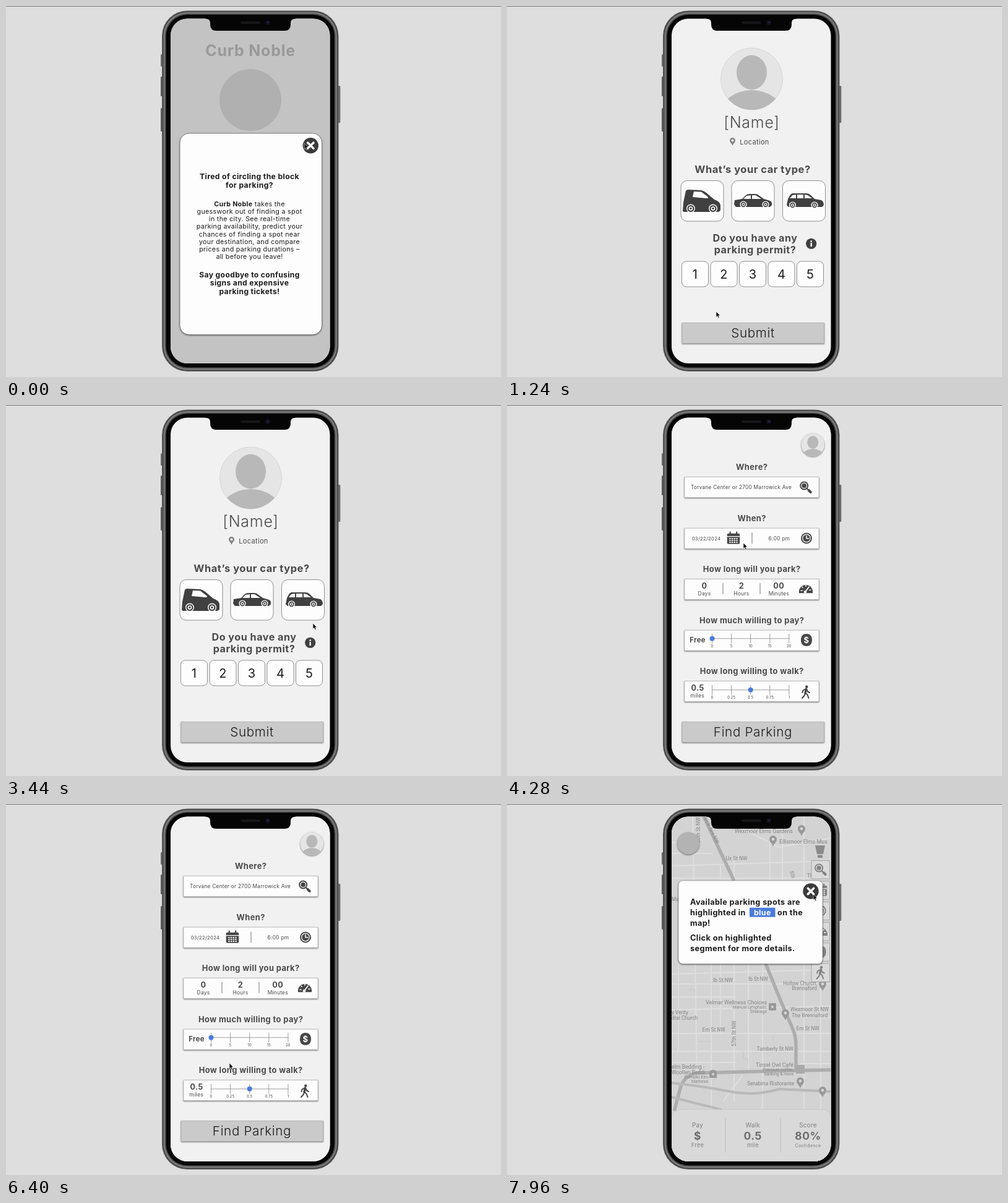
An HTML page that plays this animation: 800 by 600 pixels, repeating every 8000 ms.

```html
<!DOCTYPE html>
<html lang="en">
<head>
<meta charset="utf-8">
<title>Parking app walkthrough</title>
<style>
html, body { margin: 0; width: 100%; height: 100%; overflow: hidden; background: #dedede; }
svg { display: block; width: 800px; height: 600px; }
text { font-family: Inter, sans-serif; letter-spacing: .03em; text-anchor: middle; fill: #4a4a4a; }
.b { font-weight: 700; }
.t { font-weight: 300; }
.s { text-anchor: start; }
.e { text-anchor: end; }
.ink text, .ink { fill: #1c1c1c; }
.map text { font-family: Roboto, sans-serif; letter-spacing: 0; fill: #858585; }
.shade { filter: drop-shadow(0 1px 1px #0008); }
.line { fill: none; stroke-linecap: round; stroke-linejoin: round; }
</style>
</head>
<body>
<svg id="stage" viewBox="0 0 800 600"></svg>
<script>
const text = (x, y, size, str, cls = '', more = '') =>
  `<text x="${x}" y="${y}" font-size="${size}" class="${cls}" ${more}>${str}</text>`;
const lines = (x, y, step, size, list, cls) =>
  list.map((str, i) => text(x, y + i * step, size, str, cls)).join('');
const rect = (x, y, w, h, rx, fill, more = '') =>
  `<rect x="${x}" y="${y}" width="${w}" height="${h}" rx="${rx}" fill="${fill}" ${more}/>`;
const circle = (x, y, r, fill, more = '') =>
  `<circle cx="${x}" cy="${y}" r="${r}" fill="${fill}" ${more}/>`;
const path = (d, fill, more = '') => `<path d="${d}" fill="${fill}" ${more}/>`;
const stroke = (d, color, width, more = '') =>
  `<path class="line" d="${d}" stroke="${color}" stroke-width="${width}" ${more}/>`;
const use = (id, x, y, scale = 1) =>
  `<use href="#${id}" transform="translate(${x} ${y}) scale(${scale})"/>`;
const page = (fill = '#f1f1f1') => rect(264, 18, 262, 564, 0, fill);
const shaded = 'class="shade"';

const dark = '#474747';
const defs = `<defs>
  <clipPath id="screen">${rect(266, 20.5, 257.5, 557.5, 27, '#000')}</clipPath>
  <clipPath id="round">${circle(0, 0, 50, '#000')}</clipPath>
  <g id="avatar">${circle(0, 0, 50, '#e5e5e5', 'stroke="#d6d6d6"')}
    <g clip-path="url(#round)" fill="#b8b8b8"><ellipse cy="-10.5" rx="24.5" ry="28"/><ellipse cy="53" rx="48" ry="35"/></g></g>
  <g id="close">${circle(0, 0, 12.7, '#3b3b3b')}${stroke('M-4.7-4.7L4.7 4.7M4.7-4.7L-4.7 4.7', '#fff', 3.4)}</g>
  <g id="search">${circle(-2.5, -2.5, 6, '#fff', `stroke="${dark}" stroke-width="2"`)}${circle(-2.5, -2.5, 3.8, dark)}
    ${stroke('M2.5 2.5L4.5 4.5', dark, 2)}${stroke('M5 5L8 8', dark, 4)}</g>
  <g id="calendar">${rect(-10, -7.5, 20.5, 17, 2, dark)}${stroke('M-10-2.5H10', '#fff', 1.2)}
    ${stroke('M-5-9.5V-6M5.5-9.5V-6', dark, 2.2)}
    ${stroke('M-6.5 1H7M-6.5 4H7M-6.5 7H7', '#fff', 1.8, 'style="stroke-linecap:butt;stroke-dasharray:2.4 1.3"')}</g>
  <g id="clock">${circle(0, 0, 9, dark)}${circle(0, 0, 6.3, 'none', 'stroke="#fff" stroke-width="1.2"')}
    ${stroke('M0-4V.3H3.6', '#fff', 1.5)}</g>
  <g id="gauge">${path('M-11 7A11.2 11.2 0 1 1 11 7Z', dark)}
    ${stroke('M-8 3H-6M-6-3L-5-2M0-6V-4M6 2H8', '#fff', 1.5)}${stroke('M-1 5L5-3', '#fff', 1.8)}${circle(-1, 5, 2.2, '#fff')}</g>
  <g id="dollar">${path('M0-10C6-10 9-6 9 0S6 10 0 10S-9 6-9 0S-6-10 0-10', dark)}
    ${text(0, 4.8, 13, '$', 'b', 'style="fill:#fff"')}</g>
  <g id="walk">${circle(1.3, -8.2, 2.2, dark)}${stroke('M.5-4.5L-1 2', dark, 3.4)}
    ${stroke('M0-5L-4.5-2.5L-5.5 1M1.5-4L3-.5L6 1M-1 2L-2.5 6L-6 10M-1 1.5L2.5 4.5L4.5 10', dark, 2)}</g>
  <g id="pin">${path('M0 10C-1 5-6 3-6-2A6 6 0 0 1 6-2C6 3 1 5 0 10Z', '#999')}${circle(0, -2, 2.3, '#d8d8d8')}</g>
</defs>`;

// Nested rounded bands, from the outer edge inwards
const band = (inset, fill) => rect(252 + inset, 7.5 + inset, 285.5 - 2 * inset, 583.5 - 2 * inset, 41 - inset, fill);
const phone = rect(250, 78, 4, 20, 1.5, '#6a6a6a') + rect(250, 114, 4, 32, 1.5, '#5a5a5a') +
  rect(250, 165, 4, 38, 1.5, '#5a5a5a') + rect(536, 129, 4.3, 60, 1.5, '#6a6a6a') +
  band(0, '#5c5c5c') + band(1.2, '#444') + band(2.6, '#7c7c7c') + band(4.8, '#4e4e4e') + band(6.6, '#050505');

const notch = path('M322 14V20.5Q330 20.5 330 27V30Q330 40 340 40H450Q460 40 460 30V27Q460 20.5 468 20.5V14Z', '#050505') +
  rect(379, 25, 32, 4, 2, '#171719') + circle(423, 27, 4, '#10101f') + circle(423.5, 26.5, 1.5, '#262650');

const appName = 'Curb Noble';
const home = page('#c3c3c3') + text(395, 80.5, 25, appName, 'b', 'style="fill:#999"') + circle(395, 152, 50, '#b0b0b0') +
  rect(281, 206, 229.5, 325.5, 15, '#fdfdfd', shaded + ' stroke="#777" stroke-width=".8"') + use('close', 492.3, 225.7) +
  '<g class="ink">' + lines(393.5, 280, 14, 12.2, ['Tired of circling the block', 'for parking?'], 'b') +
  lines(393.5, 323.5, 12.25, 10.7, [`<tspan class="b">${appName}</tspan> takes the`, 'guesswork out of finding a spot',
    'in the city. See real-time', 'parking availability, predict your', 'chances of finding a spot near',
    'your destination, and compare', 'prices and parking durations –', 'all before you leave!']) +
  lines(393.5, 438.8, 13.4, 12.1, ['Say goodbye to confusing', 'signs and expensive', 'parking tickets!'], 'b') + '</g>';

const wheel = (x, y, r) => circle(x, y, r + 1.4, '#fff') + circle(x, y, r, '#404040') + circle(x, y, r * .6, '#fff') + circle(x, y, r * .3, '#404040');
const car = (body, glass, y, r, ...xs) => path(body, '#404040') + path(glass, '#fff') + xs.map(x => wheel(x, y, r)).join('');
const cars =
  car('M284 331L285 318L289 299Q290 297 293 297L314 298Q318 299 322 302L335 313Q344 316 345 322V330Q344 333 340 333H288Q284 333 284 331Z',
    'M300 309L302 300L314 300.500L325 309Q326 311 322 311Z', 327.5, 5.6, 297, 333) +
  car('M367 321L368 314L380 312L386 306Q388 304 392 304H402Q405 304 408 307L415 312L425 315Q429 317 428 322L425 325H370Z',
    'M382 312L387 307L394 306V312ZM396 312V306H402L411 312Z', 321, 4.2, 382, 418) +
  car('M452 322L454 312L458 305L461 303H484Q488 303 491 306L497 312L508 314Q512 316 512 322L509 325H455Z',
    'M457 311L461 306L467 305V311ZM469 311V305H479V311ZM481 311V305L486 306L493 311Z', 322, 4.2, 461.5, 497);

const button = str => rect(283, 512.5, 229.5, 33, 0, '#cacaca', shaded + ' stroke="#aaa" stroke-width=".6"') +
  text(397.5, 536, 20.7, str, 'ink t');

const profile = page() + use('avatar', 395.5, 118) + text(395.5, 197.3, 25, '[Name]', 't') +
  path('M364.5 226C363 222 360 220.5 360 217.5A4.5 4.5 0 0 1 369 217.5C369 220.5 366 222 364.5 226Z', '#858585') +
  circle(364.5, 217.5, 2, '#f1f1f1') + text(400, 223.5, 11, 'Location') +
  text(397, 269.5, 16.5, 'What’s your car type?', 'b') +
  [281, 363, 445.5].map(x => rect(x, 282.5, 69, 65.5, 10, '#fdfdfd', 'stroke="#777" stroke-width=".8"')).join('') + cars +
  text(401, 381, 16.2, 'Do you have any', 'b') + text(401, 400, 16.2, 'parking permit?', 'b') +
  circle(491.7, 384.3, 8.6, '#404040') + circle(491.7, 380.6, 1.4, '#fff') + rect(490.5, 383, 2.4, 6.2, 0, '#fff') +
  [1, 2, 3, 4, 5].map(n => rect(236 + n * 46.5, 413, 43, 41, 7, '#fdfdfd', 'stroke="#777" stroke-width=".8"') +
    text(257.7 + n * 46.5, 440.8, 20, n, 'ink')).join('') + button('Submit');

const permit = rect(264, 18, 262, 564, 0, '#afafaf', 'opacity=".71"') +
  rect(281.5, 329, 233, 148, 8, '#fdfdfd', shaded + ' stroke="#888" stroke-width=".6"') + use('close', 497.2, 348) +
  '<g class="ink">' + lines(308, 367.6, 15.05, 12.6, ['To help us suggest the', 'best parking options,', 'please let us know if you',
    'have a current DC', 'resident parking permit', 'or any other parking', 'permits that may apply.'], 's') + '</g>';

const slider = (y, dot, labels) => stroke(`M331.5 ${y}H456`, '#8a8a8a', .8) + labels.map((str, i) =>
  stroke(`M${331.5 + i * 31.1} ${y - 7.5}v15`, '#777', .7) + text(331.5 + i * 31.1, y + 14, 5.8, str)).join('') +
  circle(331.5 + dot * 31.1, y, 4, '#4a7bdc');
const heads = ['Where?', 'When?', 'How long will you park?', 'How much willing to pay?', 'How long willing to walk?'];
const divider = (x, y) => stroke(`M${x} ${y - 8.5}v17`, '#777', 1);
const find = page() + `<g ${shaded}>${circle(494.3, 64.3, 18.8, '#e0e0e0')}</g>` + use('avatar', 494.3, 64.3, .37) +
  heads.map((str, i) => text(395.7, 105 + i * 82.6, 12.9, str, 'b') +
    rect(287, 116.7 + i * 82.5, 217, 33, 0, '#fdfdfd', shaded + ' stroke="#aaa" stroke-width=".6"')).join('') +
  text(297, 136.3, 8.3, 'Torvane Center or 2700 Marrowick Ave', 's') + use('search', 482.7, 133) +
  text(322, 218.7, 7.8, '03/22/2024') + use('calendar', 365.7, 215.2) + divider(396, 215.5) +
  text(440, 218.7, 8.4, '6:00 pm') + use('clock', 484, 215.5) +
  [[319, '0', 'Days'], [379, '2', 'Hours'], [439.3, '00', 'Minutes']].map(([x, n, unit]) =>
    text(x, 296.8, 12.7, n, 'b') + text(x, 307.5, 8.4, unit)).join('') +
  divider(349, 297) + divider(409, 297) + use('gauge', 483, 297.3) +
  text(308, 383.8, 11.3, 'Free', 'b') + slider(377.7, 0, [0, 5, 10, 15, 20]) + use('dollar', 484, 380) +
  text(308, 462.3, 12.5, '0.5', 'b') + text(307.7, 473.2, 8.7, 'miles') +
  slider(460.8, 2, [0, .25, .5, .75, 1]) + use('walk', 483, 464) + button('Find Parking');

const labels = [
  [368, 46.5, 8.8, 'Wexmoor Elms Gardens', 's'], [440, 63.5, 8.8, 'Ellismoor Elms Mus', 's'],
  [371, 90.5, 8.3, 'Ux St NW'], [349, 288, 8.3, 'Ib St NW'], [406, 286, 8.3, 'Ib St NW'],
  [501, 292.5, 8.2, 'Hollow Church,', 'e'], [501, 300.5, 8.2, 'Brennaford', 'e'],
  [420, 324, 8.8, 'Velmar Wellness Choices', 'e'], [420, 331.3, 6.8, 'Manual Lymphatic', 'e'], [420, 338.3, 6.8, 'Drainage', 'e'],
  [458, 335.3, 8.5, 'Wexmoor St NW', 's'], [460, 345, 8.5, 'The Brennaford', 's'],
  [334, 367.7, 8.3, 'Em St NW'], [486, 366.3, 8.3, 'Em St NW'], [266, 340, 8.3, 'y Verity', 's'], [266, 348.8, 8.3, 'dral Church', 's'],
  [433, 398.5, 8.3, 'Tamberly St NW'], [463, 425.3, 8.8, 'Tinsel Owl Café', 'e'],
  [463, 432.3, 6.8, 'Premium coffee,', 'e'], [463, 438.8, 6.8, 'banking &amp; more', 'e'],
  [388, 454.5, 8.8, 'Serabina Ristorante', 's'], [266, 428.3, 8.8, 'elm Bedding -', 's'], [266, 436.8, 8.5, 'Woollen Beddi', 's'],
  [325, 444.3, 6.8, 'Pomello Elm', 'e'], [325, 451, 6.8, 'Mattress', 'e'], [266, 157, 8.3, 'Ma', 's'], [485, 119, 8.3, 'Th', 's']];
const turned = (x, y, angle, str) => `<g transform="translate(${x} ${y}) rotate(${angle})">${text(0, 0, 8.3, str, 's')}</g>`;
const streets = 'M266 62H310M266 100L523 92M266 120H523M266 275L523 268M266 291H523M266 312H370M266 333L523 327M266 371H523' +
  'M266 400H523M266 418H370M475 345H523M475 420H523M300 20L307 436M277 258V400M330 258V494M345 100V372M367 90V480' +
  'M390 258V432M413 258V494M425 60V130M445 20V140M480 20V494M507 288V494M266 80H330M340 20L440 70M440 70L523 55M350 480L380 440';
const map = page('#d3d3d3') + stroke(streets, '#dedede', 2) +
  stroke('M382 400V412H389V422M310 384H330M430 375V384M291 300H303V309', '#c4c4c4', .8) +
  stroke('M317 18L365 120L418 258L443 320L462 364Q467 376 467 390V429M523 430L467 431L310 435Q290 436 281 456L271 494', '#adadad', 5.5) +
  stroke('M266 451Q320 457 360 465T440 461L523 465M266 474L345 494', '#b9b9b9', 4) +
  '<g class="map">' + labels.map(a => text(...a)).join('') + turned(370, 392, -90, '57th St NW') +
  turned(312, 63, -90, '58th St NW') + turned(314, 15, 64, 'rowick Ave NW') + turned(457, 109, 75, '55t') + '</g>' +
  [[476, 42], [430, 59], [510, 293], [450, 340], [474, 450], [510, 465]].map(([x, y]) => use('pin', x, y)).join('') +
  rect(423, 322, 12, 12, 2, '#999') + circle(429, 328, 2, '#d8d8d8') + rect(467, 422, 14, 14, 0, '#a9a9a9') +
  path('M327 443V435Q327 430 333 430T339 435V443Z', '#999') + circle(333, 437, 2, '#d8d8d8') +
  `<g ${shaded}>${circle(293, 63.5, 18, '#b3b3b3')}</g>` + path('M498 67H514L511 81H501Z', '#8b8b8b') + rect(502, 82.5, 8, 4.5, 0, '#8b8b8b') +
  ['search', 'calendar', 'clock', 'gauge', 'dollar', 'walk'].map((id, i) =>
    rect(492, 91.5 + i * 33.3, 29.5, 29.5, 0, '#dadada', 'stroke="#a8a8a8"') +
    `<g opacity=".6">${use(id, 506.7, 106 + i * 33.3)}</g>`).join('') +
  rect(266, 494, 258, 100, 15, '#d9d9d9', 'stroke="#c4c4c4" stroke-width=".8"') + stroke('M353 508V563M442 508V563', '#bcbcbc', 1) +
  [[308, 'Pay', '$', 'Free', 9.2], [397.3, 'Walk', '0.5', 'mile', 9.2], [486.5, 'Score', '80%', 'Confidence', 7.3]]
    .map(([x, top, value, unit, size]) => `<g opacity=".62">${text(x, 523.3, 9.8, top)}${text(x, 554.6, size, unit)}</g>` +
      text(x, 542.5, 17.5, value, 'b', 'opacity=".75"')).join('') +
  rect(277, 124, 233, 134.5, 7, '#fdfdfd', shaded + ' stroke="#888" stroke-width=".6"') + use('close', 491, 141) +
  '<g class="ink">' + lines(296, 162.5, 17.2, 12.7, ['Available parking spots are', 'highlighted in', 'map!'], 's b') +
  text(437, 179.7, 12.7, 'on the', 's b') + lines(296, 221.2, 17.2, 12.8, ['Click on highlighted', 'segment for more details.'], 's b') + '</g>' +
  rect(392, 167.7, 41.5, 15, 0, '#4a7bdc') + text(412.8, 179.6, 12.4, 'blue', 'b', 'style="fill:#fff"');

const layer = (id, body) => `<g id="${id}">${body}</g>`;
const stage = document.getElementById('stage');
stage.innerHTML = defs + rect(0, 0, 800, 600, 0, '#dedede') + rect(0, 0, 800, 1, 0, '#777') + phone +
  '<g clip-path="url(#screen)">' + layer('profile', profile) + layer('home', home) + layer('permit', permit) +
  layer('find', find) + layer('map', map) + '</g>' + notch +
  layer('cursor', path('M0 0V9.2L2.1 7.4L3.6 10.7L5.2 10L3.8 6.8L6.5 6.5Z', '#111', 'stroke="#fff" stroke-width=".6"'));

// Cursor stops: time, x, y
const stops = [[0, 482, 222], [200, 482, 222], [320, 489, 226], [800, 489, 226], [1240, 338, 494], [1320, 338, 494],
  [1520, 343, 475], [1560, 343, 475], [2240, 487, 386], [2840, 487, 386], [3120, 496, 353], [3460, 496, 353],
  [3600, 421, 529], [3900, 421, 529], [4280, 382, 223], [4720, 372, 217], [5260, 372, 217], [5760, 353, 320],
  [5940, 353, 320], [6400, 361, 419], [6720, 397, 528], [7240, 397, 528], [7920, 494, 147], [7960, 495, 146], [8000, 495, 146]];
const clamp = v => Math.min(1, Math.max(0, v));
const ease = v => v * v * (3 - 2 * v);
const fade = (t, from, to) => ease(clamp((t - from) / (to - from)));
const show = (id, value) => {
  const el = document.getElementById(id);
  el.style.opacity = value;
  el.style.display = value ? '' : 'none';
};

function draw(now) {
  const t = now % 8000;
  show('home', 1 - fade(t, 680, 800));
  show('permit', t < 3000 ? fade(t, 2400, 2600) : 1 - fade(t, 3240, 3360));
  show('find', fade(t, 3640, 3760));
  show('map', fade(t, 7080, 7220));
  const i = stops.findIndex(stop => stop[0] > t);
  const [t0, x0, y0] = stops[i - 1], [t1, x1, y1] = stops[i];
  const k = ease((t - t0) / (t1 - t0));
  document.getElementById('cursor').setAttribute('transform', `translate(${x0 + (x1 - x0) * k} ${y0 + (y1 - y0) * k})`);
  requestAnimationFrame(() => draw(performance.now()));
}
draw(0);
</script>
</body>
</html>
```
